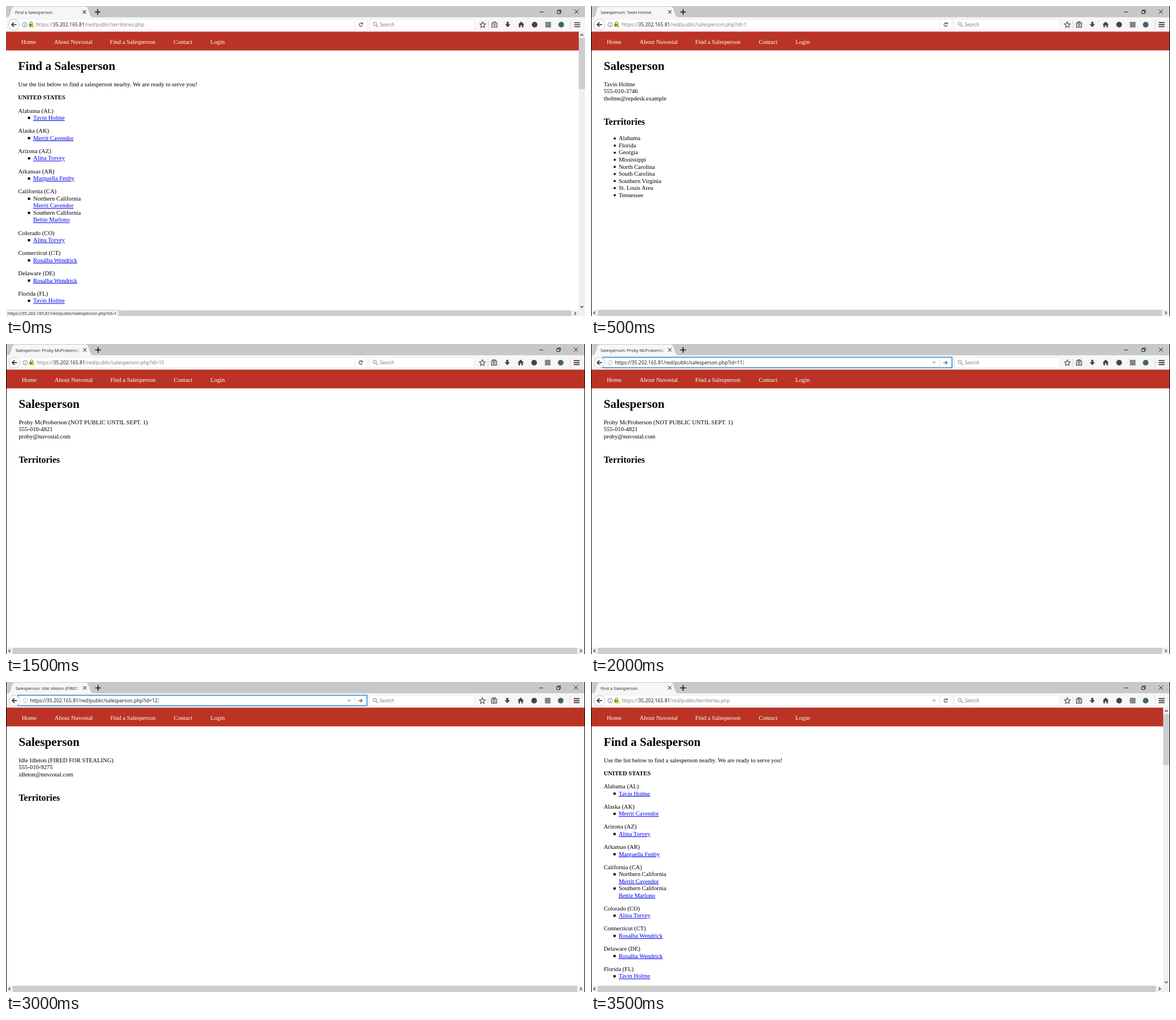
These frames come from a looping animation (1023x548 px, 4 s). An HTML page:

```html
<!DOCTYPE html>
<html lang="en">
<head>
<meta charset="utf-8">
<title>Find a Salesperson</title>
<style>
  html, body { margin: 0; width: 100%; height: 100%; overflow: hidden; background: #000; }
  #stage { display: block; }
  text { font: 10.65px "Liberation Serif", "Times New Roman", serif; white-space: pre; }
  .h1 { font-size: 21.3px; font-weight: bold; }
  .h2 { font-size: 15.97px; font-weight: bold; }
  .bold { font-weight: bold; }
  .nav { fill: #fff; }
  .link { fill: #00e; text-decoration: underline; }
  .ui { font: 7.55px "Open Sans", sans-serif; fill: #222; }
  .url { font: 8.65px "Open Sans", sans-serif; fill: #777; }
  .host { fill: #111; }
  .hint { font-style: italic; }
  .line { fill: none; stroke: #444; stroke-width: 1.1; }
</style>
</head>
<body>
<svg id="stage" width="1023" height="548"></svg>
<script>
const stage = document.getElementById('stage');
const HOST = '35.202.165.81', LINE = 12.52, LEFT = 21.5, INDENT = 48;

const text = (x, y, s, cls = '') => `<text x="${x}" y="${y}" class="${cls}">${s}</text>`;
const rect = (x, y, w, h, fill, more = '') =>
  `<rect x="${x}" y="${y}" width="${w}" height="${h}" fill="${fill}" ${more}/>`;
const circle = (x, y, r, fill, more = '') => `<circle cx="${x}" cy="${y}" r="${r}" fill="${fill}" ${more}/>`;
const line = (d, more = '') => `<path d="${d}" class="line" ${more}/>`;
const shape = (d, fill = '#444') => `<path d="${d}" fill="${fill}"/>`;

const territories = [
  ['Alabama (AL)', 'Tavin Holme'],
  ['Alaska (AK)', 'Merrit Cavendor'],
  ['Arizona (AZ)', 'Alina Torvey'],
  ['Arkansas (AR)', 'Marguella Fenby'],
  ['California (CA)', ['Northern California', 'Merrit Cavendor'], ['Southern California', 'Bettie Marlono']],
  ['Colorado (CO)', 'Alina Torvey'],
  ['Connecticut (CT)', 'Rosalba Wendrick'],
  ['Delaware (DE)', 'Rosalba Wendrick'],
  ['Florida (FL)', 'Tavin Holme'],
];

const tavin = {
  name: 'Tavin Holme', phone: '555-010-3746', mail: 'tholme@repdesk.example',
  areas: ['Alabama', 'Florida', 'Georgia', 'Mississippi', 'North Carolina', 'South Carolina',
    'Southern Virginia', 'St. Louis Area', 'Tennessee'],
};
const proby = {
  name: 'Proby McProberson (NOT PUBLIC UNTIL SEPT. 1)', phone: '555-010-4821', mail: 'proby@nuvostal.com', areas: [],
};
const idle = {
  name: 'Idle Idleton (FIRED FOR STEALING)', phone: '555-010-9275', mail: 'idleton@nuvostal.com', areas: [],
};

const scenes = [
  { status: 1 },
  { person: tavin, id: 1 },
  { person: tavin, id: 10, typing: true },
  { person: proby, id: 10 },
  { person: proby, id: 11, typing: true },
  { person: idle, id: 11 },
  { person: idle, id: 12, typing: true },
  { drop: true },
];

function windowFrame(title) {
  return rect(0, 0, 1023, 20, '#c8c8c8') + rect(0, 20, 1023, 26, '#f6f6f6') +
    shape('M2 20C10 20 7 1 15 1H140C148 1 145 20 154 20Z', '#f6f6f6') +
    `<svg width="130" height="20">${text(16, 13.6, title, 'ui')}</svg>` +
    rect(120, 3, 10.5, 15, 'url(#fade)') +
    line('M135.5 7.5l6 6m0-6l-6 6') +
    line('M157 10.5h10m-5-5v10', 'style="stroke:#111;stroke-width:1.6"') +
    line('M943 10.5h7M974 8.5h5v5h-5zM975.5 8.5v-1.5h5v5h-1.5M1004.5 6.5l7 7m0-7l-7 7', 'style="stroke:#222;stroke-width:1"');
}

function addressBar({ person, id, typing, drop }) {
  const path = person ? `/red/public/salesperson.php?id=${id}` : '/red/public/territories.php';
  const infoColor = typing ? '#bbb' : '#777';
  let out = rect(20, 23.5, 618, 18.5, '#fff', `stroke="${typing ? '#1580d3' : '#e4e4e4'}" stroke-width="${typing ? 1.4 : .6}"`) +
    circle(14, 33, 9.6, '#fdfdfd', 'stroke="#bbb" stroke-width=".8"') +
    line('M18.5 33H10m4-4l-4 4 4 4', 'style="stroke:#333;stroke-width:1.7"') +
    circle(33, 33, 4, 'none', `stroke="${infoColor}" stroke-width=".9"`) +
    line('M33 32.3v3M33 30.4v1', `style="stroke:${infoColor}"`);
  if (typing) {
    out += `<text x="41.5" y="36.1" class="url host">https://${HOST}${path}<tspan dx="-.5" style="font-weight:300">|</tspan></text>` +
      line('M622.5 33h7m-3-3l3 3-3 3');
  } else {
    out += line('M42.3 32v-2a2 2 0 0 1 4 0v2', 'style="stroke:#4a9a32"') + rect(40.6, 31.5, 7, 5, '#4a9a32') +
      shape('M46.5 31.5l3.8 6.2h-7.6z', '#f5c400') +
      `<text x="53.3" y="36.1" class="url">https://<tspan class="host">${HOST}</tspan>${path}</text>` +
      line('M629.3 31a3 3 0 1 0 .5 3') + shape('M630.5 28.8v3.4h-3.4z');
  }
  if (typing || drop) out += shape('M603 31h7l-3.5 4.5z', '#bbb');
  return out + line('M616.5 25v16', 'style="stroke:#e2e2e2"');
}

function toolbar() {
  return rect(643, 23.5, 185, 18.5, '#fff', 'stroke="#e4e4e4" stroke-width=".6"') +
    line('M654 34l3.3 3.3', 'style="stroke:#777"') + circle(651.8, 31.7, 2.9, 'none', 'stroke="#777"') +
    text(660.5, 36.1, 'Search', 'url hint') +
    line('M842.3 28l1.5 3.4 3.6.4-2.7 2.5.8 3.7-3.2-1.9-3.2 1.9.8-3.7-2.7-2.5 3.6-.4z') +
    line('M852.5 26v14M997.5 24v18', 'style="stroke:#d8d8d8"') +
    line('M858.5 30h9v7.5h-9zM861 29.5v-1.5h4v1.5M860.5 32.5h5m-5 2.5h5', 'style="stroke-width:1.2"') +
    shape('M884.7 28h3.6v4.2h3l-4.8 5.5-4.8-5.5h3z') +
    shape('M910.2 27.5l5.5 5.3h-1.5v5h-2.7v-3.5h-2.6v3.5h-2.7v-5h-1.5z') +
    circle(934, 33, 5, '#444') + rect(953, 28, 10, 10, '#858585') + circle(981, 33, 5, '#40636c') +
    line('M1004 29.5h10.5M1004 33h10.5M1004 36.5h10.5', 'style="stroke:#333;stroke-width:1.7"');
}

function navBar(width) {
  const items = [[27, 'Home'], [85, 'About Nuvostal'], [183.5, 'Find a Salesperson'], [296, 'Contact'], [361, 'Login']];
  return rect(0, 45.4, width, 33.2, '#bb3324') + items.map(([x, s]) => text(x, 66.8, s, 'nav')).join('');
}

function territoryPage() {
  let y = 188.5;
  let out = text(LEFT, 113, 'Find a Salesperson', 'h1') +
    text(LEFT, 142.2, 'Use the list below to find a salesperson nearby. We are ready to serve you!') +
    text(LEFT, 165.3, 'UNITED STATES', 'bold');
  for (const [state, ...entries] of territories) {
    out += text(LEFT, y, state);
    for (const entry of entries) {
      y += LINE;
      out += rect(38.7, y - 5.2, 4, 4, '#000');
      if (Array.isArray(entry)) {
        out += text(INDENT, y, entry[0]);
        y += LINE;
      }
      out += text(INDENT, y, [].concat(entry).pop(), 'link');
    }
    y += 23.2;
  }
  return out;
}

function personPage({ name, phone, mail, areas }) {
  return text(LEFT, 113, 'Salesperson', 'h1') +
    [name, phone, mail].map((s, i) => text(LEFT, 142.2 + i * LINE, s)).join('') +
    text(LEFT, 210.6, 'Territories', 'h2') +
    areas.map((s, i) => {
      const y = 237.9 + i * 12.56;
      return circle(41, y - 3.2, 1.9, '#000') + text(INDENT, y, s);
    }).join('');
}

function scrollBars(tall) {
  const end = tall ? 999 : 1010, mid = end + 7;
  const dark = 'style="stroke:#444;stroke-width:1.4"';
  let out = rect(0, 538, 1023, 12, '#f0f0f0') + rect(11, 538, end - 11, 12, '#cdcdcd') +
    line(`M6.5 541l-2.5 2.5 2.5 2.5M${mid - 1.5} 541l2.5 2.5-2.5 2.5`, dark);
  if (tall) {
    out += rect(1012, 45.4, 11, 492.6, '#f0f0f0') + rect(1012, 57, 11, 90, '#cdcdcd') +
      line('M1015 52.5l2.5-2.5 2.5 2.5M1015 530.5l2.5 2.5 2.5-2.5', dark);
  }
  return out;
}

function statusBubble(id) {
  return rect(-1, 537.5, 200, 12, '#f2f2f2', 'stroke="#c4c4c4" stroke-width=".8"') +
    text(2.8, 545.7, `https://${HOST}/red/public/salesperson.php?id=${id}`, 'ui');
}

function render(scene) {
  const { person, status } = scene;
  const title = person ? `Salesperson: ${person.name}` : 'Find a Salesperson';
  const fit = status ? '' : 'transform="translate(1) scale(.998)"';
  stage.innerHTML = `<linearGradient id="fade"><stop stop-color="#f6f6f6" stop-opacity="0"/>
    <stop offset="1" stop-color="#f6f6f6"/></linearGradient><g ${fit}>` +
    rect(0, 0, 1023, 550, '#fff') + windowFrame(title) + addressBar(scene) + toolbar() +
    navBar(person ? 1023 : 1012) + (person ? personPage(person) : territoryPage()) +
    scrollBars(!person) + (status ? statusBubble(status) : '') + '</g>';
}

let shown = -1;
function tick() {
  const step = Math.floor(performance.now() / 500) % scenes.length;
  if (step !== shown) render(scenes[shown = step]);
  requestAnimationFrame(tick);
}
tick();
</script>
</body>
</html>
```
